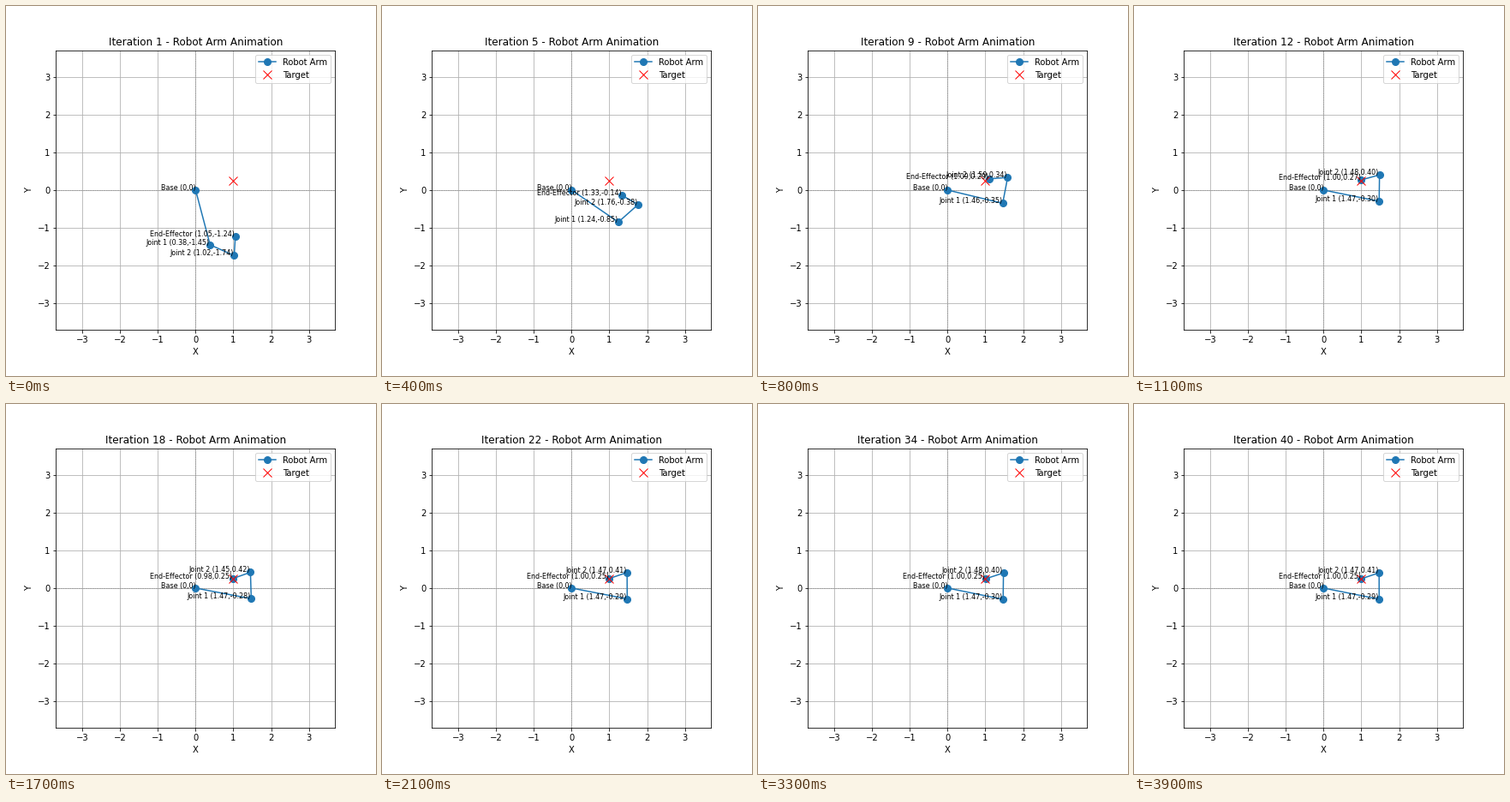
Animation, 432 px wide and 432 px high, one loop 4 s. Source, as a matplotlib script:

```python
import numpy as np
import matplotlib.pyplot as plt
from matplotlib.animation import FuncAnimation

FRAMES = 40
INTERVAL = 100
LINKS = np.array([1.5, 0.7, 0.5])
TARGET = (1.0, 0.25)
REACH = LINKS.sum() + 1
HALF_PIXEL = REACH / 326

# One value per link, angles in degrees from the x axis
START = np.array([-75.2, -24.1, 86.7])
END = np.array([-11.33, 89.8, 198.4])
TAU = np.array([3.96, 4.436, 4.554])
POWER = np.array([1.73, 1.463, 1.329])
SWING = np.array([0.78, 3.9, 2.85])
ONSET = np.array([10.5, 8, 8])


def link_angles(t):
    """Ease from START to END, then overshoot in a damped swing."""
    approach = (START - END) * np.exp(-(t / TAU) ** POWER)
    late = np.maximum(t - ONSET, 0)
    ripple = SWING * np.exp(-0.064 * late) * np.sin(0.22 * late)
    return END + approach + ripple


def joints(t):
    a = np.radians(link_angles(t))
    x = np.concatenate(([0], np.cumsum(LINKS * np.cos(a))))
    y = np.concatenate(([0], np.cumsum(LINKS * np.sin(a))))
    return x, y


plt.rcParams["font.family"] = "DejaVu Sans"
fig, ax = plt.subplots(figsize=(6, 6), dpi=72)
fig.subplots_adjust(left=0.125, right=0.9, bottom=0.125, top=0.88)
ax.set_xlim(-REACH, REACH)
ax.set_ylim(-REACH, REACH)
ax.set_aspect("equal")
ax.set_xticks(range(-3, 4))
ax.set_yticks(range(-3, 4))
ax.grid(True)
ax.axhline(0, color="gray", linewidth=0.5, linestyle="--")
ax.axvline(0, color="gray", linewidth=0.5, linestyle="--")
ax.set_xlabel("X")
ax.set_ylabel("Y")

arm, = ax.plot([], [], "o-", color="tab:blue", markersize=8, label="Robot Arm")
ax.plot(*TARGET, "rx", markersize=10, label="Target")
ax.legend(loc="upper right")
title = ax.set_title("")

ax.text(0, 0, "Base (0,0)", fontsize=8, ha="right")
NAMES = ["Joint 1", "Joint 2", "End-Effector"]
labels = [ax.text(0, 0, "", fontsize=8, ha="right") for _ in NAMES]


def update(frame):
    x, y = joints(frame)
    arm.set_data(x, y)
    for label, name, px, py in zip(labels, NAMES, x[1:], y[1:]):
        label.set_position((px - HALF_PIXEL, py))
        label.set_text(f"{name} ({px:.2f},{py:.2f})")
    title.set_text(f"Iteration {frame + 1} - Robot Arm Animation")
    return [arm, title, *labels]


anim = FuncAnimation(fig, update, frames=FRAMES, interval=INTERVAL,
                     repeat=True, repeat_delay=0, blit=False)
plt.show()
```
